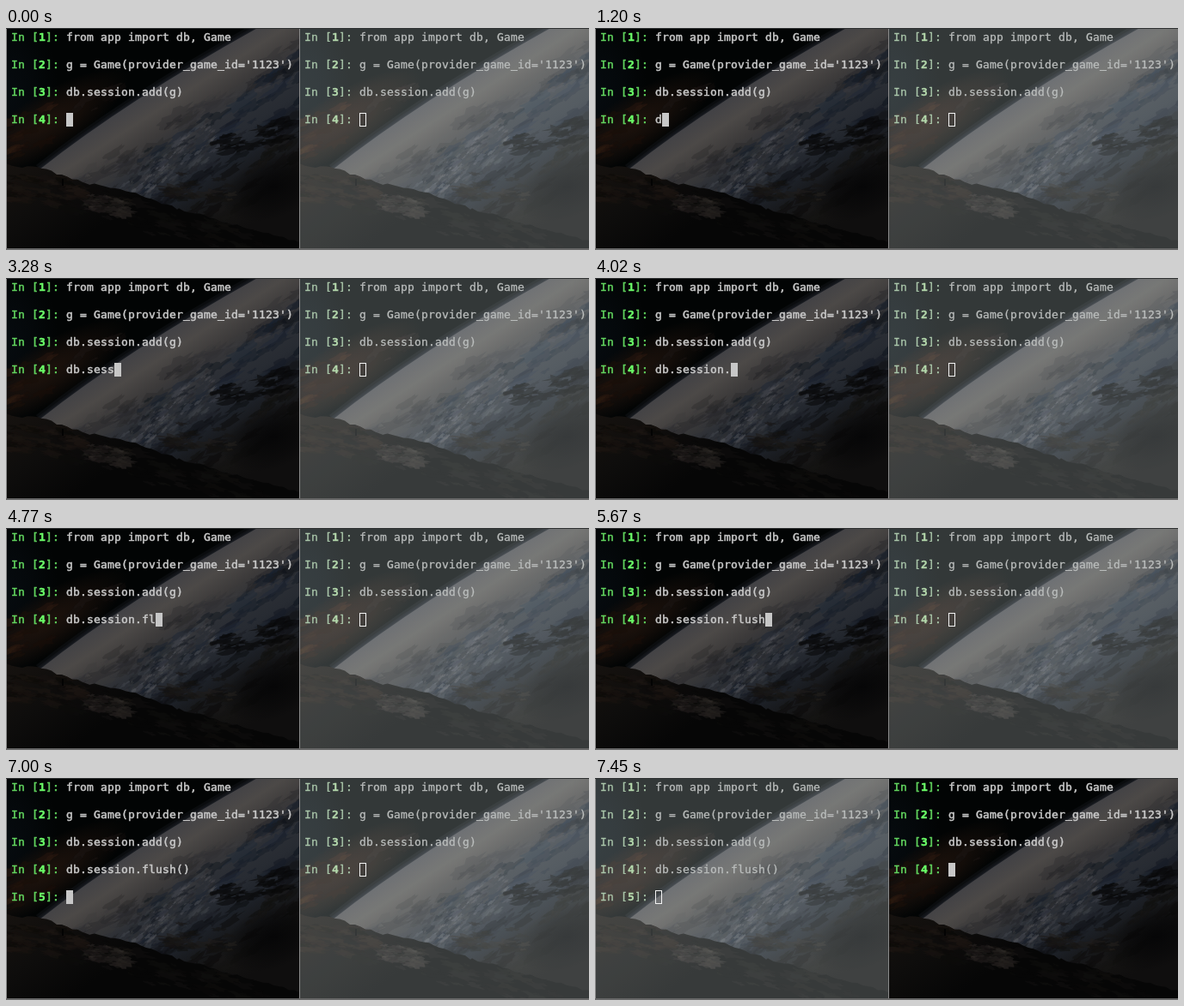
Recreate the animation shown at these times as an HTML page with a canvas. Size 678 px wide and 259 px high, loop 8000 ms.

```html
<!DOCTYPE html>
<html lang="en">
<head>
<meta charset="utf-8">
<title>Two shells</title>
<style>
html, body { margin: 0; width: 100%; height: 100%; overflow: hidden; background: #000; }
canvas { display: block; }
</style>
</head>
<body>
<canvas id="stage" width="678" height="259"></canvas>
<script>
const W = 678, H = 259, LOOP = 8000;
const CELL = 8, ROW = 16, LEFT = 6, TOP = 3, SPLIT = 341;
const FONT = '13px "DejaVu Sans Mono", monospace';
const ctx = document.getElementById('stage').getContext('2d');

const LINES = [
  'from app import db, Game',
  "g = Game(provider_game_id='1123')",
  'db.session.add(g)'
];
const COMMAND = 'db.session.flush()';
// Moment of each keystroke.
const KEYS = [1200, 1940, 2090, 2540, 2840, 3140, 3280, 3580, 3580, 3870,
  4020, 4470, 4770, 5070, 5370, 5670, 6110, 6410];
const ENTER = 6850, PROMPT = 7000, SWITCH = 7450;

const THEMES = {
  active: { text: '#c9c9c9', prompt: '#62d65f', number: '#6bff68', cursor: '#c7c7c7', weight: 0.5 },
  idle: { text: '#babdbc', prompt: '#abc8ab', number: '#b4d8ac', cursor: '#f4f4f4', weight: 0.3 }
};

function seeded(seed) {
  return () => {
    seed = (seed * 1664525 + 1013904223) >>> 0;
    return seed / 4294967296;
  };
}

const rnd = seeded(41);
const between = (a, b) => a + rnd() * (b - a);
const rgba = (rgb, alpha, k = 1) =>
  `rgba(${rgb.map(v => Math.round(v * k)).join()},${alpha})`;

function newLayer() {
  const layer = document.createElement('canvas');
  layer.width = 340;
  layer.height = 257;
  return layer;
}

function glow(c, x, y, rx, ry, rgb, angle = 0) {
  c.save();
  c.translate(x, y);
  c.rotate(angle);
  c.scale(rx, ry);
  const g = c.createRadialGradient(0, 0, 0, 0, 0, 1);
  g.addColorStop(0, rgba(rgb, 1));
  g.addColorStop(0.5, rgba(rgb, 0.6));
  g.addColorStop(1, rgba(rgb, 0));
  c.fillStyle = g;
  c.fillRect(-1, -1, 2, 2);
  c.restore();
}

// Ragged blot with a flat colour.
function blot(c, x, y, rx, ry) {
  const n = 17;
  c.beginPath();
  for (let i = 0; i < n; i++) {
    const a = i / n * Math.PI * 2, r = between(0.35, 1.25);
    c.lineTo(x + Math.cos(a) * rx * r, y + Math.sin(a) * ry * r);
  }
  c.fill();
}

// Blots around a centre, in lighter and darker tones of one colour.
function scatter(c, count, [x, y, w, h], size, rgb, alpha = 0.5, angle = 0) {
  c.save();
  c.translate(x, y);
  c.rotate(angle);
  for (let i = 0; i < count; i++) {
    const k = between(0.25, 1.2);
    c.fillStyle = rgba(rgb, alpha, between(0.5, 1.3));
    blot(c, between(-w, w), between(-h, h), size * k, size * k * 0.3);
  }
  c.restore();
}

function traceLimb(c) {
  c.moveTo(38, 165);
  c.quadraticCurveTo(140, 84, 295, -2);
}

function drawSky(c) {
  c.fillStyle = '#020404';
  c.fillRect(0, 0, 340, 257);
  glow(c, 0, 75, 60, 100, [6, 11, 15]);
  glow(c, 45, 112, 110, 34, [29, 18, 12], -0.55);
  scatter(c, 22, [28, 118, 40, 22], 18, [38, 22, 14], 0.55, -0.4);
  scatter(c, 10, [100, 88, 30, 9], 16, [22, 17, 15], 0.5, -0.55);
}

function drawPlanet(c) {
  c.save();
  c.strokeStyle = 'rgba(65,72,84,.13)';
  for (const w of [13, 7, 3]) {
    c.lineWidth = w;
    c.beginPath();
    traceLimb(c);
    c.stroke();
  }
  c.beginPath();
  traceLimb(c);
  c.lineTo(342, -2);
  c.lineTo(342, 259);
  c.lineTo(38, 259);
  c.closePath();
  c.clip();

  // Axes now run along the limb and into the disc.
  c.translate(38, 163);
  c.rotate(-0.575);
  const g = c.createLinearGradient(0, -6, 0, 190);
  const tones = ['#414145', '#4c4947', '#3c3a3a', '#2c2f35', '#272b32', '#1d2128', '#161719', '#131211', '#0f0e0e'];
  tones.forEach((tone, i) => g.addColorStop(i / (tones.length - 1), tone));
  c.fillStyle = g;
  c.fillRect(-60, -20, 460, 320);

  scatter(c, 60, [185, 50, 165, 16], 24, [48, 48, 51], 0.3, 0.03);
  scatter(c, 55, [215, 76, 125, 26], 22, [23, 31, 43], 0.45);
  scatter(c, 130, [105, 82, 85, 23], 11, [55, 58, 64], 0.45, -0.08);
  scatter(c, 110, [125, 78, 70, 13], 6, [70, 71, 75], 0.5, -0.1);
  scatter(c, 50, [175, 108, 110, 14], 18, [21, 23, 28], 0.5);
  scatter(c, 50, [180, 145, 130, 25], 19, [19, 18, 17], 0.55);
  c.restore();

  scatter(c, 22, [295, 128, 55, 13], 20, [9, 9, 10], 0.6, -0.25);
  glow(c, 310, 185, 62, 36, [6, 6, 7], -0.4);
  scatter(c, 24, [225, 184, 38, 16], 15, [29, 26, 24], 0.55);
}

const RIDGE = [[0, 160], [40, 164], [90, 180], [150, 193], [200, 211], [250, 225], [340, 250]];

function drawMountain(c) {
  c.save();
  c.beginPath();
  RIDGE.slice(1).forEach(([x1, y1], i) => {
    const [x0, y0] = RIDGE[i];
    for (let x = x0; x < x1; x += 6) {
      c.lineTo(x, y0 + (y1 - y0) * (x - x0) / (x1 - x0) + between(-1.5, 1.5));
    }
  });
  c.lineTo(340, 250);
  c.lineTo(340, 259);
  c.lineTo(0, 259);
  c.closePath();
  c.clip();
  const g = c.createLinearGradient(0, 160, 70, 259);
  g.addColorStop(0, '#16120f');
  g.addColorStop(0.5, '#0e0d0c');
  g.addColorStop(1, '#060606');
  c.fillStyle = g;
  c.fillRect(0, 155, 340, 104);
  scatter(c, 65, [45, 188, 55, 18], 14, [23, 18, 15], 0.6, 0.1);
  scatter(c, 65, [175, 224, 125, 18], 18, [14, 13, 12], 0.55, 0.25);
  scatter(c, 45, [117, 207, 25, 11], 11, [39, 35, 33], 0.55, 0.1);
  c.restore();
  c.fillStyle = '#030303';
  c.fillRect(64, 176, 2, 8);
}

function drawScene() {
  const layer = newLayer(), c = layer.getContext('2d');
  drawSky(c);
  drawPlanet(c);
  drawMountain(c);
  return layer;
}

function lighten(scene) {
  const layer = newLayer(), c = layer.getContext('2d');
  c.fillStyle = 'rgb(49,52,52)';
  c.fillRect(0, 0, layer.width, layer.height);
  c.globalCompositeOperation = 'lighter';
  c.globalAlpha = 0.92;
  c.drawImage(scene, 0, 0);
  return layer;
}

const scene = drawScene();
const backdrops = { active: scene, idle: lighten(scene) };

// Terminal text sits on a fixed cell grid.
function write(text, x, row, color, weight, bold) {
  ctx.font = (bold ? 'bold ' : '') + FONT;
  ctx.fillStyle = ctx.strokeStyle = color;
  ctx.lineWidth = weight;
  [...text].forEach((ch, i) => {
    const at = [ch, x + i * CELL, TOP + row * ROW + 12];
    ctx.fillText(...at);
    ctx.strokeText(...at);
  });
}

function drawPane(x, mode, lines, cursor) {
  const theme = THEMES[mode], left = x + LEFT;
  ctx.drawImage(backdrops[mode], x + 1, 0);
  lines.forEach((line, i) => {
    const row = i * 2;
    write('In [', left, row, theme.prompt, theme.weight);
    write(String(i + 1), left + 4 * CELL, row, theme.number, theme.weight, true);
    write(']:', left + 5 * CELL, row, theme.prompt, theme.weight);
    write(line, left + 8 * CELL, row, theme.text, theme.weight);
  });
  const cx = left + cursor.col * CELL, cy = TOP + cursor.row * ROW;
  if (mode === 'active') {
    ctx.fillStyle = theme.cursor;
    ctx.fillRect(cx, cy, CELL, ROW);
  } else {
    ctx.strokeStyle = theme.cursor;
    ctx.lineWidth = 1;
    ctx.strokeRect(cx + 0.5, cy + 0.5, CELL - 1, ROW - 1);
  }
}

function drawFrame() {
  ctx.fillStyle = '#8b8b8b';
  ctx.fillRect(0, 0, 1, H);
  ctx.fillRect(SPLIT, 0, 1, H);
  ctx.fillStyle = '#686868';
  ctx.fillRect(0, 257, W, 2);
  ctx.fillStyle = '#303233';
  ctx.fillRect(0, 0, W, 1);
}

function draw(t) {
  const typed = KEYS.filter(k => k <= t).length;
  const lines = [...LINES, COMMAND.slice(0, typed)];
  let cursor = { col: 8 + typed, row: 6 };
  if (t >= PROMPT) {
    lines.push('');
    cursor = { col: 8, row: 8 };
  } else if (t >= ENTER) {
    cursor = { col: 0, row: 7 };
  }
  const switched = t >= SWITCH;
  drawPane(0, switched ? 'idle' : 'active', lines, cursor);
  drawPane(SPLIT, switched ? 'active' : 'idle', [...LINES, ''], { col: 8, row: 6 });
  drawFrame();
}

const start = performance.now();
function tick() {
  draw((performance.now() - start) % LOOP);
  requestAnimationFrame(tick);
}
tick();
</script>
</body>
</html>
```
